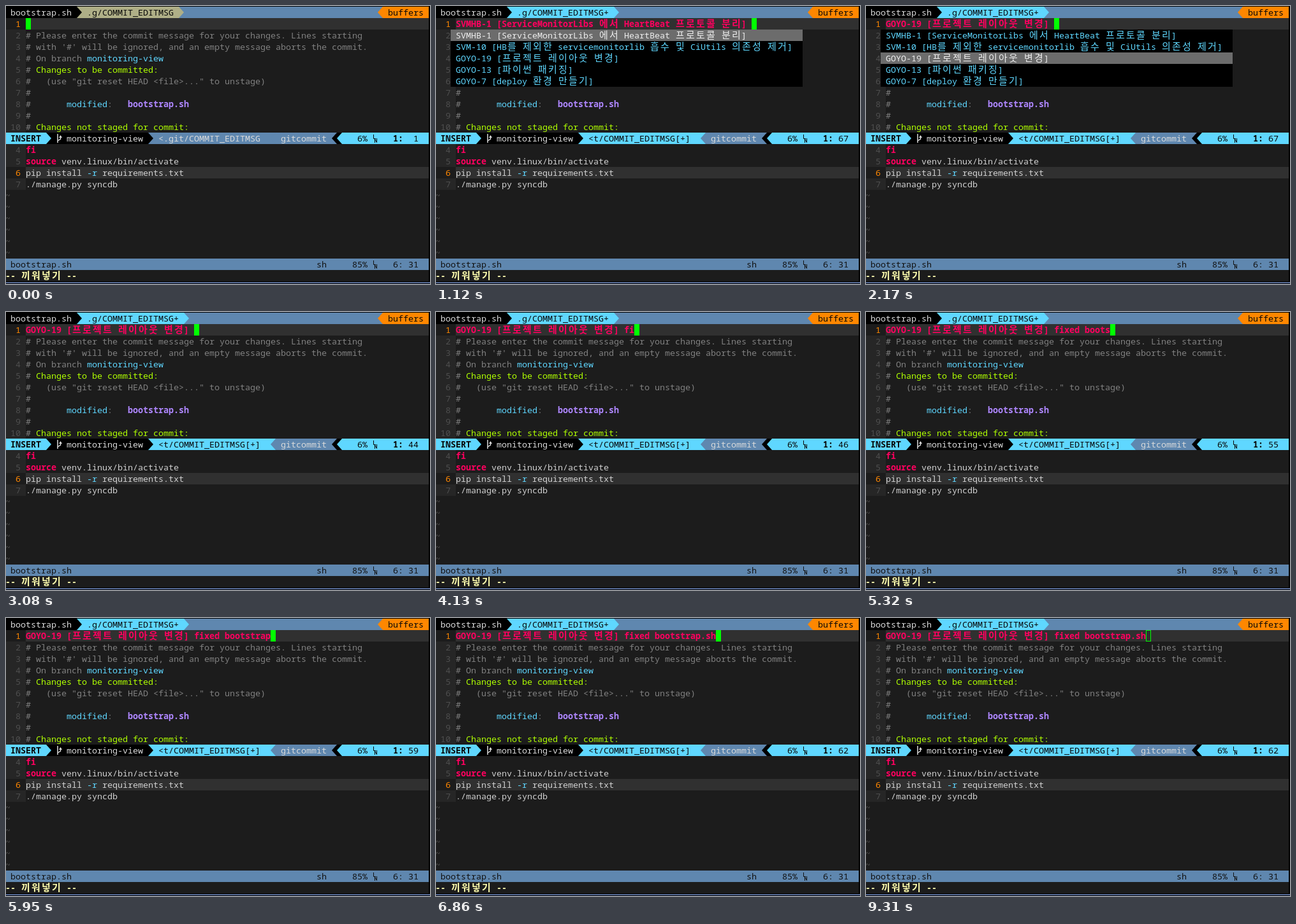
An HTML page with a canvas for the animation above (9450 ms loop, 665 px wide and 437 px high).

```html
<!DOCTYPE html>
<html lang="ko">
<head>
<meta charset="utf-8">
<title>Commit message completion</title>
<style>
html, body { margin: 0; width: 100%; height: 100%; overflow: hidden; background: #000; }
canvas { display: block; }
</style>
</head>
<body>
<canvas id="term" width="665" height="437"></canvas>
<script>
const ctx = document.getElementById('term').getContext('2d');
const LOOP = 9450, CW = 8, CH = 18, COLS = 83;

const C = {
  bg: '#1c1c1c', gutter: '#262626', line: '#303030', dim: '#4e4e4e', comment: '#808080',
  fg: '#d0d0d0', light: '#dadada', ink: '#080808', black: '#000', blue: '#5f87af',
  cyan: '#5fd7ff', tan: '#afaf87', orange: '#ff8700', pink: '#ff005f', lime: '#afff00',
  purple: '#af87ff', cream: '#ffffaf', cursor: '#00ff00', sel: '#6c6c6c', selText: '#eeeeee'
};

const items = [
  'SVMHB-1 [ServiceMonitorLibs 에서 HeartBeat 프로토콜 분리]',
  'SVM-10 [HB를 제외한 servicemonitorlib 흡수 및 CiUtils 의존성 제거]',
  'GOYO-19 [프로젝트 레이아웃 변경]',
  'GOYO-13 [파이썬 패키징]',
  'GOYO-7 [deploy 환경 만들기]'
];
const typed = 'fixed bootstrap.sh';
const keyTimes = [3920, 4130, 4200, 4410, 4550, 4690, 4830, 4970, 5110, 5180,
  5320, 5530, 5740, 5810, 5950, 6650, 6790, 6860];
const T = { popup: 700, bars: 1120, second: 1820, third: 2170, accept: 3080, blur: 9310 };

const X = col => col * CW - 1;
const Y = row => row * CH + 1;
const isWide = ch => ch >= '\uac00' && ch <= '\ud7a3';
const cells = s => [...s].reduce((n, ch) => n + (isWide(ch) ? 2 : 1), 0);

function fill(row, from, to, color, rows = 1) {
  ctx.fillStyle = color;
  ctx.fillRect(X(from), Y(row), (to - from) * CW, rows * CH);
}

// Writes on the character grid and returns the next free column.
function put(row, col, s, color, bold = false) {
  const weight = bold ? 'bold ' : '';
  ctx.fillStyle = color;
  ctx.textAlign = 'center';
  for (const ch of s) {
    const w = isWide(ch) ? 2 : 1;
    ctx.font = weight + (w === 2
      ? '15px "Noto Sans CJK KR", "Noto Sans CJK", sans-serif'
      : '13.4px "Noto Sans Mono", "DejaVu Sans Mono", monospace');
    if (ch !== ' ') ctx.fillText(ch, X(col) + w * CW / 2, Y(row) + 14);
    col += w;
  }
  return col;
}

function spans(row, col, ...parts) {
  for (const [s, color, bold] of parts) col = put(row, col, s, color, bold);
}

// Separator triangle; dir 1 points right, -1 points left.
function arrow(row, col, color, dir = 1) {
  const base = X(dir > 0 ? col : col + 1), y = Y(row);
  ctx.fillStyle = color;
  ctx.beginPath();
  ctx.moveTo(base, y);
  ctx.lineTo(base + dir * CW, y + CH / 2);
  ctx.lineTo(base, y + CH);
  ctx.fill();
}

function branchIcon(row, col, color) {
  const x = X(col), y = Y(row);
  ctx.strokeStyle = color;
  ctx.lineWidth = 1.5;
  ctx.beginPath();
  ctx.moveTo(x + 2, y + 2);
  ctx.lineTo(x + 2, y + 16);
  ctx.moveTo(x + 2, y + 13);
  ctx.lineTo(x + 6.5, y + 10);
  ctx.lineTo(x + 6.5, y + 6);
  ctx.stroke();
  ctx.fillStyle = color;
  ctx.beginPath();
  ctx.moveTo(x + 4, y + 8);
  ctx.lineTo(x + 6.5, y + 4);
  ctx.lineTo(x + 9, y + 8);
  ctx.fill();
}

function lineIcon(row, col, color) {
  const x = X(col), y = Y(row);
  ctx.strokeStyle = color;
  ctx.lineWidth = 1;
  ctx.beginPath();
  ctx.moveTo(x + 1.5, y + 3);
  ctx.lineTo(x + 1.5, y + 9.5);
  ctx.lineTo(x + 5, y + 9.5);
  ctx.moveTo(x + 3.5, y + 16);
  ctx.lineTo(x + 3.5, y + 10);
  ctx.lineTo(x + 6.5, y + 15.5);
  ctx.lineTo(x + 6.5, y + 9);
  ctx.stroke();
}

function number(row, n, current) {
  if (current) fill(row, 4, COLS, C.line);
  else fill(row, 0, 4, C.gutter);
  put(row, 0, String(n).padStart(3), current ? C.orange : C.dim);
}

function tabs(changed) {
  const end = changed ? 35 : 34, tab = changed ? C.cyan : C.tan;
  fill(0, 0, COLS, C.blue);
  fill(0, 0, 14, C.black);
  fill(0, 14, end, tab);
  arrow(0, 14, C.black);
  arrow(0, end, tab);
  put(0, 1, 'bootstrap.sh', C.light);
  put(0, 16, '.g/COMMIT_EDITMSG' + (changed ? '+' : ''), C.ink);
  arrow(0, 73, C.orange, -1);
  fill(0, 74, COLS, C.orange);
  put(0, 75, 'buffers', C.ink);
}

function message() {
  const g = C.comment;
  for (let n = 1; n <= 10; n++) {
    number(n, n, n === 1);
    if (n > 1) put(n, 4, '#', g);
  }
  put(2, 6, 'Please enter the commit message for your changes. Lines starting', g);
  put(3, 6, "with '#' will be ignored, and an empty message aborts the commit.", g);
  spans(4, 6, ['On branch ', g], ['monitoring-view', C.cyan]);
  put(5, 6, 'Changes to be committed:', C.lime);
  put(6, 8, '(use "git reset HEAD <file>..." to unstage)', g);
  spans(8, 12, ['modified', C.cyan], [':   ', g], ['bootstrap.sh', C.purple, true]);
  put(10, 6, 'Changes not staged for commit:', C.lime);
}

function popup(chosen) {
  fill(2, 3, 72, C.black, items.length);
  fill(2 + chosen, 3, 72, C.sel);
  items.forEach((s, i) => put(2 + i, 4, s, i === chosen ? C.selText : C.cyan));
}

function activeBar(changed, column) {
  const r = 11, mid = changed ? C.cyan : C.blue;
  fill(r, 0, 8, C.cyan);
  fill(r, 8, 28, C.black);
  arrow(r, 8, C.cyan);
  put(r, 1, 'INSERT', C.ink, true);
  branchIcon(r, 10, C.light);
  put(r, 12, 'monitoring-view', C.light);
  fill(r, 28, 53, mid);
  arrow(r, 28, C.black);
  put(r, 30, changed ? '<t/COMMIT_EDITMSG[+]' : '<.git/COMMIT_EDITMSG', changed ? C.ink : C.light);
  arrow(r, 52, C.blue, -1);
  fill(r, 53, 65, C.blue);
  put(r, 54, 'gitcommit', C.light);
  arrow(r, 64, C.black, -1);
  fill(r, 65, 66, C.black);
  arrow(r, 65, C.cyan, -1);
  fill(r, 66, COLS, C.cyan);
  put(r, 69, '6%', C.ink);
  lineIcon(r, 72, C.ink);
  put(r, 76, '1:', C.ink, true);
  put(r, 78, String(column).padStart(3), C.ink);
}

function script() {
  for (let n = 4; n <= 7; n++) number(8 + n, n, n === 6);
  put(12, 4, 'fi', C.pink, true);
  spans(13, 4, ['source', C.pink, true], [' venv.linux/bin/activate', C.fg]);
  spans(14, 4, ['pip install ', C.fg], ['-r', C.cyan], [' requirements.txt', C.fg]);
  put(15, 4, './manage.py syncdb', C.fg);
  for (let r = 16; r < 22; r++) put(r, 0, '~', C.dim);
  fill(22, 0, COLS, C.blue);
  put(22, 1, 'bootstrap.sh', '#121212');
  put(22, 61, 'sh', '#121212');
  put(22, 68, '85%', '#121212');
  lineIcon(22, 72, '#121212');
  put(22, 76, '6: 31', '#121212');
  put(23, 0, '-- 끼워넣기 --', C.cream, true);
}

function cursor(col, hollow) {
  if (!hollow) return fill(1, col, col + 1, C.cursor);
  ctx.strokeStyle = C.cursor;
  ctx.lineWidth = 1;
  ctx.strokeRect(X(col) + 0.5, Y(1) + 0.5, CW - 1, CH - 1);
}

function draw(t) {
  const chosen = t < T.second ? 0 : t < T.third ? 1 : 2;
  const keys = keyTimes.filter(k => k <= t).length;
  const title = t < T.popup ? '' : items[chosen] + ' ' + typed.slice(0, keys);
  const changed = t >= T.bars;
  const column = !changed ? 1 : t < T.accept ? 67 : 44 + keys;

  ctx.fillStyle = C.black;
  ctx.fillRect(0, 0, 665, 437);
  fill(0, 0, COLS, C.bg, 24);
  ctx.fillStyle = '#5a6f9c';
  ctx.fillRect(0, 434, 665, 2);

  tabs(changed);
  message();
  put(1, 4, title, C.pink, true);
  cursor(4 + cells(title), t >= T.blur);
  if (t >= T.popup && t < T.accept) popup(chosen);
  activeBar(changed, column);
  script();
}

const start = performance.now();
function tick() {
  draw((performance.now() - start) % LOOP);
  requestAnimationFrame(tick);
}
tick();
</script>
</body>
</html>
```
